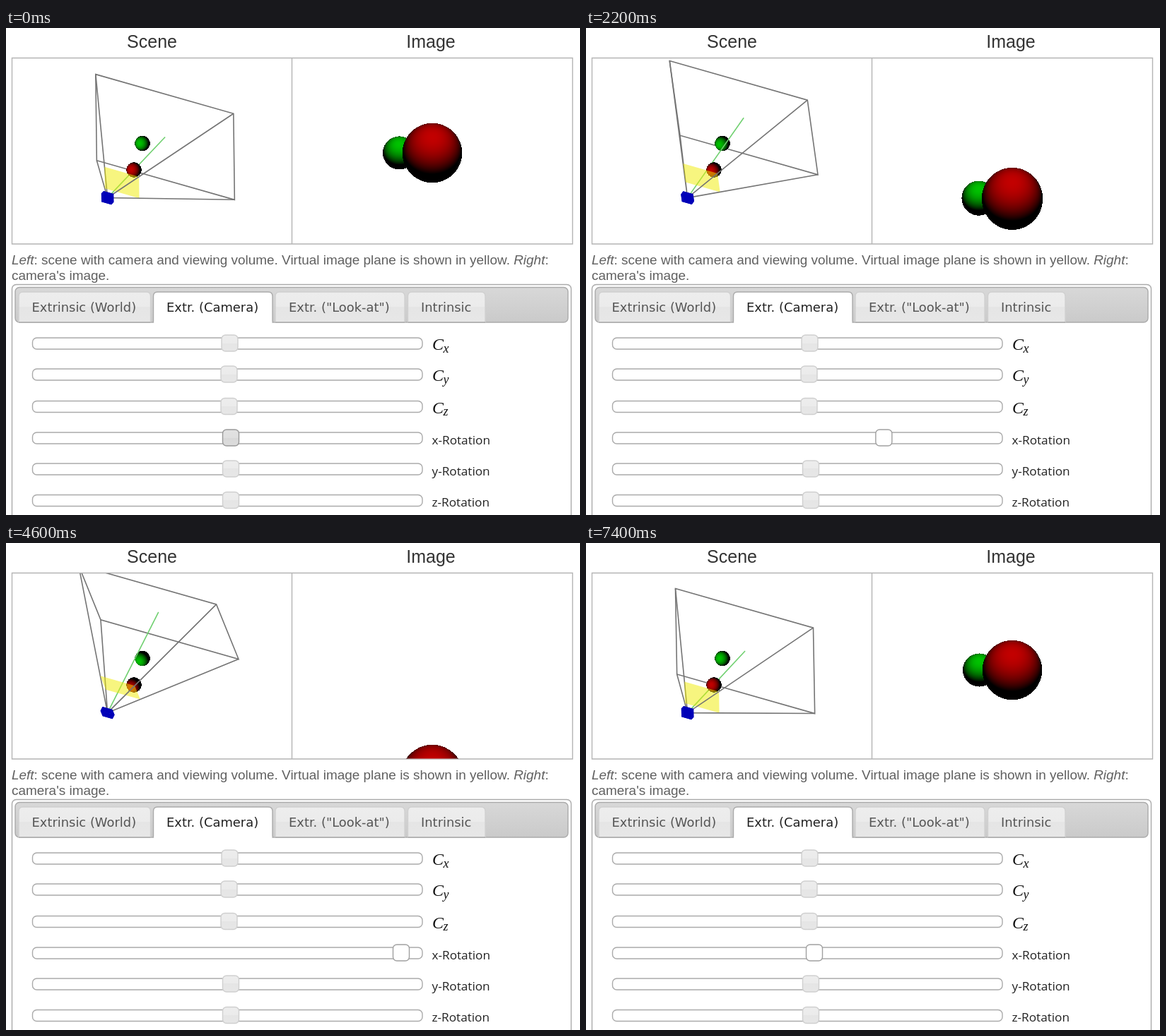
Recreate the animation shown at these times as an HTML page with a canvas. Size 812 by 690 pixels, loop 8000 ms.

```html
<!DOCTYPE html>
<html lang="en">
<head>
<meta charset="utf-8">
<title>Camera rotation</title>
<style>
html, body { margin: 0; width: 100%; height: 100%; overflow: hidden; background: #fff; }
svg, canvas { position: absolute; left: 0; top: 0; display: block; }
.title { font: 25px "Liberation Sans", Arial, sans-serif; fill: #333; text-anchor: middle; }
.note { font: 18.95px "Liberation Sans", Arial, sans-serif; fill: #606060; }
.tab { font: 17.9px "DejaVu Sans", Verdana, sans-serif; fill: #555; }
.tab.on { fill: #212121; }
.label { font: 17.2px "Open Sans", "Noto Sans", sans-serif; fill: #222; }
.math { font: italic 24px "Liberation Serif", Times, serif; fill: #111; }
.math .sub { font-size: 18px; }
</style>
</head>
<body>
<svg id="ui" width="812" height="690" viewBox="0 0 812 690">
  <defs>
    <linearGradient id="bar" x2="0" y2="1"><stop stop-color="#d8d8d8"/><stop offset="1" stop-color="#cacaca"/></linearGradient>
    <linearGradient id="glass" x2="0" y2="1">
      <stop stop-color="#ededed"/><stop offset=".5" stop-color="#ebebeb"/>
      <stop offset=".5" stop-color="#e5e5e5"/><stop offset="1" stop-color="#e7e7e7"/>
    </linearGradient>
    <linearGradient id="hover" x2="0" y2="1">
      <stop stop-color="#e2e2e2"/><stop offset=".5" stop-color="#dfdfdf"/>
      <stop offset=".5" stop-color="#d8d8d8"/><stop offset="1" stop-color="#dcdcdc"/>
    </linearGradient>
  </defs>
  <text class="title" x="206.5" y="28">Scene</text>
  <text class="title" x="601" y="28">Image</text>
  <path d="M8.5 42.5H801.5V306H8.5ZM404.5 42.5V306" fill="none" stroke="#b4b4b4" stroke-width="1.4"/>
  <text class="note" x="8" y="335"><tspan font-style="italic">Left</tspan>: scene with camera and viewing volume. Virtual image plane is shown in yellow. <tspan font-style="italic">Right</tspan>:</text>
  <text class="note" x="8" y="357">camera's image.</text>
  <rect x="8.5" y="363.5" width="791" height="360" rx="6" fill="#fff" stroke="#aaa" stroke-width="1.4"/>
  <rect x="13" y="367.5" width="782" height="49.5" rx="6" fill="url(#bar)" stroke="#aaa" stroke-width="1.4"/>
</svg>
<canvas id="view" width="812" height="690"></canvas>
<script>
const ui = document.getElementById('ui');
const g = document.getElementById('view').getContext('2d');

function add(tag, attrs, text) {
  const el = document.createElementNS('http://www.w3.org/2000/svg', tag);
  for (const k in attrs) el.setAttribute(k, attrs[k]);
  if (text) el.textContent = text;
  return ui.appendChild(el);
}

// Tabs
function tab(x0, x1, textX, text, on) {
  const d = `M${x0} 417V380Q${x0} 374 ${x0 + 6} 374H${x1 - 6}Q${x1} 374 ${x1} 380V417`;
  add('path', { d, fill: on ? '#fff' : 'url(#glass)', stroke: on ? '#aaa' : '#d0d0d0', 'stroke-width': 1.4 });
  if (on) add('path', { d: `M${x0 + .7} 417H${x1 - .7}`, stroke: '#fff', 'stroke-width': 2.4 });
  else add('path', { d: `M${x0} 417H${x1}`, stroke: '#aaa', 'stroke-width': 1.4 });
  add('text', { class: on ? 'tab on' : 'tab', x: textX, y: 402 }, text);
}
tab(18, 204.5, 36.5, 'Extrinsic (World)');
tab(208.5, 377, 227, 'Extr. (Camera)', true);
tab(381, 564, 400, 'Extr. ("Look-at")');
tab(568.5, 678, 587, 'Intrinsic');

// Sliders
function slider(y, x, label, sub) {
  add('rect', { x: 37.5, y: y - 8, width: 551.5, height: 16, rx: 6, fill: '#fff', stroke: '#aaa', 'stroke-width': 1.4 });
  if (sub) {
    const math = add('text', { class: 'math', x: 603, y: y + 9 }, label);
    math.innerHTML += `<tspan class="sub" x="618.5" y="${y + 12.5}">${sub}</tspan>`;
  } else {
    add('text', { class: 'label', x: 602.5, y: y + 8.5 }, label);
  }
  return add('rect', { x: x - 11.5, y: y - 12, width: 23, height: 23, rx: 5.5, fill: 'url(#glass)', stroke: '#cfcfcf', 'stroke-width': 1.4 });
}
slider(447, 316.5, 'C', 'x');
slider(491, 315.5, 'C', 'y');
slider(536.5, 315.5, 'C', 'z');
const knob = slider(581, 318, 'x-Rotation');
slider(625, 318, 'y-Rotation');
slider(669.5, 318, 'z-Rotation');

// Sphere lit by a near lamp in direction L (right, up, towards the viewer)
const SHADE = .22;
function ball(cx, cy, rx, ry, channel, L) {
  for (let y = Math.floor(cy - ry); y <= cy + ry; y++) {
    for (let x = Math.floor(cx - rx); x <= cx + rx; x++) {
      const nx = (x + .5 - cx) / rx, ny = (cy - y - .5) / ry, q = 1 - nx * nx - ny * ny;
      if (q <= 0) continue;
      const dot = nx * L[0] + ny * L[1] + Math.sqrt(q) * L[2];
      const rgb = [0, 0, 0];
      rgb[channel] = Math.round(194 * Math.max(0, dot - SHADE) / (1 - SHADE));
      g.fillStyle = `rgb(${rgb})`;
      g.fillRect(x, y, 1, 1);
    }
  }
}

function path(points, close) {
  g.beginPath();
  points.forEach(p => g.lineTo(p[0], p[1]));
  if (close) g.closePath();
}

function panel(x, w, draw) {
  g.save();
  g.beginPath();
  g.rect(x, 43, w, 262.5);
  g.clip();
  draw();
  g.restore();
}

const RAD = Math.PI / 180, FOCAL = 317.5, LIGHT = 32 * RAD;
const TAN = Math.tan(22.5 * RAD), HALF_W = .625;

function drawScene(a) {
  const c = Math.cos(a), s = Math.sin(a);
  // Parallel projection of a point given in the tilted camera's frame
  const at = (x, y, z) => {
    const up = y * c + z * s, fwd = z * c - y * s;
    return [143.6 + 156 * x - 1.2 * up + 81.5 * fwd, 240.6 + 44.5 * x - 148 * up - 85 * fwd];
  };
  const corners = k => [[-1, 1], [1, 1], [1, -1], [-1, -1]].map(([x, y]) => at(x * HALF_W * k, y * TAN * k, k));
  const eye = at(0, 0, 0), far = corners(1);
  const e = LIGHT - a, se = Math.sin(e), ce = Math.cos(e);
  const L = [-.463 * ce, .835 * se - .483 * ce, .545 * se + .738 * ce];
  const line = (points, color, close) => {
    path(points, close);
    g.strokeStyle = color;
    g.stroke();
  };

  g.lineWidth = 1.6;
  line(far, '#747474', true);
  line([far[0], eye, far[3]], '#747474');
  ball(193, 163.5, 10.7, 10.7, 1, L);
  line([eye, at(0, 0, 1)], '#70d070');
  ball(181, 201, 10.7, 10.7, 0, L);
  path(corners(.25), true);
  g.fillStyle = 'rgba(240,236,0,.5)';
  g.fill();
  line([far[1], eye, far[2]], '#747474');

  // Camera box
  const w = .045, h = .04, d = .02;
  g.fillStyle = '#0000b8';
  for (const k of [-1, 1]) {
    const face = f => {
      path([[-1, -1], [1, -1], [1, 1], [-1, 1]].map(f).map(([x, y, z]) => at(x * w, y * h, z * d)), true);
      g.fill();
    };
    face(([u, v]) => [k, u, v]);
    face(([u, v]) => [u, k, v]);
    face(([u, v]) => [u, v, k]);
  }
}

function drawImage(a) {
  const L = [0, Math.sin(LIGHT), Math.cos(LIGHT)];
  const sphere = (dx, r, channel) => {
    const b = Math.atan(r / FOCAL), top = FOCAL * Math.tan(a - b), bottom = FOCAL * Math.tan(a + b);
    const rx = FOCAL * Math.sin(b) / Math.sqrt(Math.cos(a) ** 2 - Math.sin(b) ** 2);
    ball(603 + dx / Math.cos(a), 174.5 + (top + bottom) / 2, rx, (bottom - top) / 2, channel, L);
  };
  sphere(-46.5, 23.5, 1);
  sphere(0, 42.2, 0);
}

// Time and knob position while dragging there and back
const drag = [[600, 318], [1600, 376], [1800, 397], [3000, 470], [4200, 566], [4400, 566],
  [4600, 559], [5600, 475], [6600, 386], [6800, 363], [7400, 323]];

function knobAt(t) {
  if (t <= drag[0][0]) return drag[0][1];
  for (let i = 1; i < drag.length; i++) {
    const [t0, x0] = drag[i - 1], [t1, x1] = drag[i];
    if (t <= t1) return x0 + (x1 - x0) * (t - t0) / (t1 - t0);
  }
  return drag[drag.length - 1][1];
}

const LOOP = 8000, STEP = 200;
let shown = -1;

function update(t) {
  const x = knobAt(t), angle = .1097 * (x - 314) * RAD, held = t >= 400;
  knob.setAttribute('x', x - 11.5);
  knob.setAttribute('fill', held ? '#fff' : 'url(#hover)');
  knob.setAttribute('stroke', held ? '#a0a0a0' : '#999');
  g.clearRect(0, 0, 812, 690);
  panel(9.2, 394.6, () => drawScene(angle));
  panel(405.2, 395.6, () => drawImage(angle));
}

function tick() {
  const t = Math.floor(performance.now() % LOOP / STEP) * STEP;
  if (t !== shown) update(shown = t);
  requestAnimationFrame(tick);
}
tick();
</script>
</body>
</html>
```
